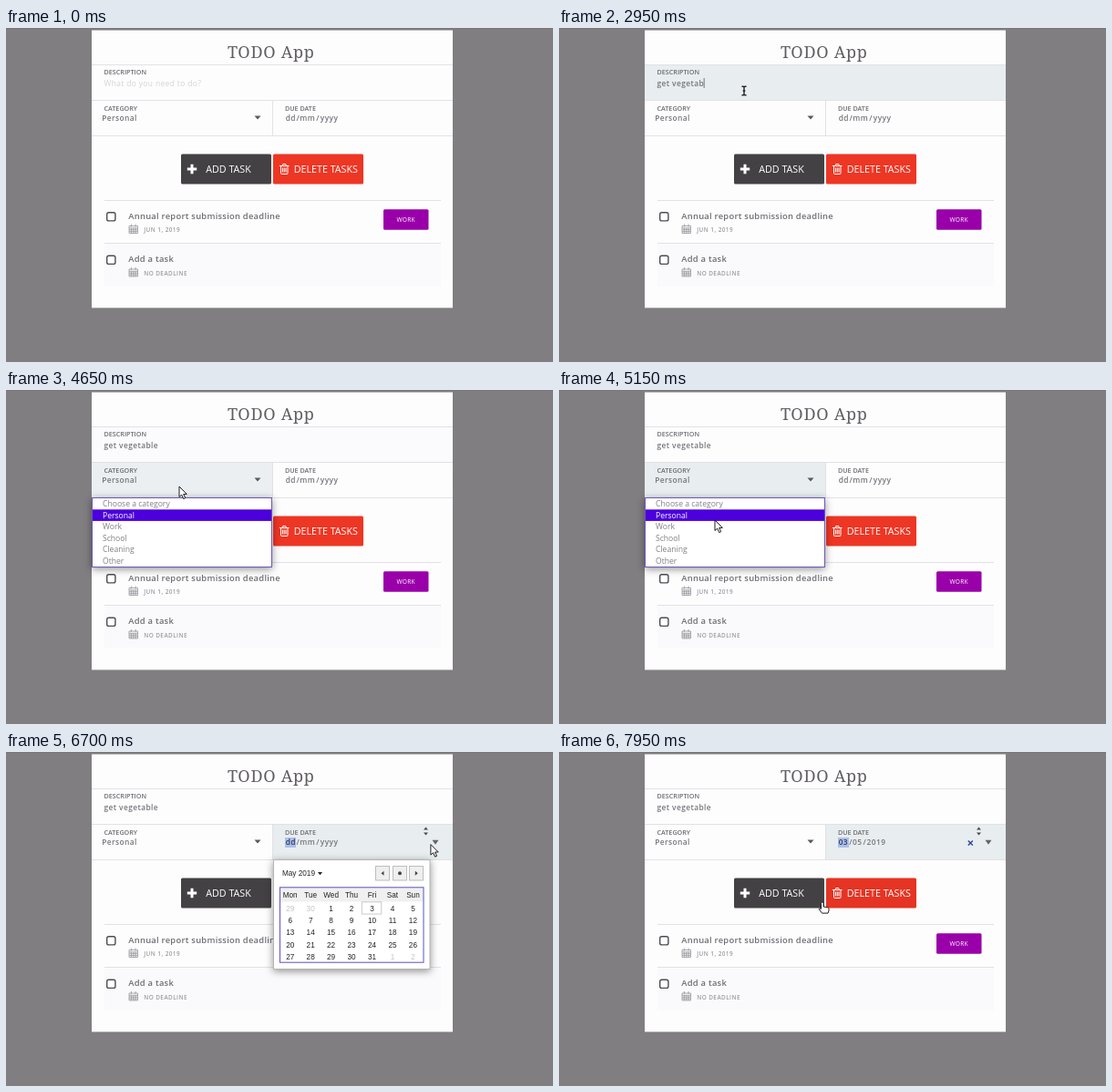
An HTML page for the animation above (8 s loop, 600x367 px).

```html
<!DOCTYPE html>
<html lang="en">
<head>
<meta charset="utf-8">
<title>Task list</title>
<style>
html, body { margin: 0; width: 100%; height: 100%; overflow: hidden; background: #807e80; }
svg { display: block; width: 600px; height: 367px; font-family: "Open Sans", sans-serif; }
text { white-space: pre; }
.title { font: 18px "Noto Serif", serif; letter-spacing: .7px; fill: #605d62; }
.label { font-size: 7.2px; font-weight: 600; fill: #6d6b70; }
.value { font-size: 8.4px; font-weight: 600; letter-spacing: .4px; fill: #76747a; }
.hint { font-weight: 400; fill: #d3d1d6; }
.task { font-size: 9.4px; font-weight: 600; letter-spacing: .25px; fill: #6f6d72; }
.due { font-size: 6.4px; font-weight: 600; letter-spacing: .45px; fill: #9a999e; }
.btn { font-size: 10.7px; fill: #fff; }
.tag { font-size: 6.6px; letter-spacing: .3px; fill: #fff; text-anchor: middle; }
.option { font-size: 8.6px; fill: #807e83; }
.line { stroke: #e2e1e5; }
.focus { fill: #e8edef; }
.popup { filter: drop-shadow(0 2px 4px rgba(0, 0, 0, .42)); }
.cal { font: 8.2px "Liberation Sans", Arial, sans-serif; fill: #222; }
.mid { text-anchor: middle; }
.off { fill: #c4c4c4; }
</style>
</head>
<body>
<svg viewBox="0 0 600 367">
  <rect width="600" height="367" fill="#807e80"/>
  <rect width="600" height="1" fill="#777577"/>
  <rect x="94" y="2.5" width="396" height="305" fill="#fefdfe"/>
  <text class="title" x="243" y="33">TODO App</text>

  <rect id="descFocus" class="focus" x="94" y="40" width="396" height="39"/>
  <rect id="catFocus" class="focus" x="94" y="79" width="198" height="39"/>
  <rect id="dateFocus" class="focus" x="292" y="79" width="198" height="39"/>
  <path class="line" d="M94 40.5H490M94 79.5H490M94 118.5H490M292.5 79V118M108 189.5H477"/>

  <text class="label" x="107.5" y="51">DESCRIPTION</text>
  <text id="hint" class="value hint" x="107.5" y="63.5">What do you need to do?</text>
  <text id="typed" class="value" x="107.5" y="63.5"></text>
  <rect id="caret" y="55" width=".8" height="11" fill="#555"/>

  <text class="label" x="107.5" y="91">CATEGORY</text>
  <text class="value" x="105.2" y="102.3">Personal</text>
  <path d="M272.5 96.5h7l-3.5 4z" fill="#5a585d"/>

  <text class="label" x="306" y="91">DUE DATE</text>
  <rect id="pick" x="306" y="94" width="12" height="11" fill="#aebfe6"/>
  <g id="date" class="value"></g>
  <g id="spinner" fill="#4a4a4d">
    <rect id="spinBox" x="456" y="80.5" width="9" height="12.5" fill="#eeedef"/>
    <path d="M458 85.5h5l-2.5-3zM458 88.5h5l-2.5 3z"/>
    <path d="M467.5 96.8h7l-3.5 5z" fill="#656469"/>
  </g>
  <path id="clear" d="M448.8 97.5l5 5m0-5l-5 5" stroke="#31449c" stroke-width="1.5"/>

  <rect x="192" y="138.5" width="99" height="33" rx="1.5" fill="#434144"/>
  <path d="M198.8 155h10.4M204 149.8v10.4" stroke="#fff" stroke-width="3"/>
  <text class="btn" x="219.3" y="159">ADD TASK</text>
  <rect x="293" y="138.5" width="99" height="33" rx="1.5" fill="#ee3624"/>
  <rect id="shade" x="293" y="138.5" width="99" height="33" rx="1.5"/>
  <path d="M300 151.5h10.5M303 151.3l.8-1.8h2.9l.8 1.8M301.5 151.5v8q0 1 1 1h5.500q1 0 1-1v-8M303.500 153.500v5M305.250 153.500v5M307 153.500v5" fill="none" stroke="#fff"/>
  <text class="btn" x="315.8" y="159">DELETE TASKS</text>

  <g id="tasks"></g>
  <rect x="414" y="199.3" width="49.500" height="22.500" rx="1.500" fill="#9a00a9"/>
  <text class="tag" x="438.7" y="213">WORK</text>

  <g id="menu" class="popup"></g>
  <g id="calendar" class="popup"></g>

  <path id="arrow" d="M0 0V11.500L2.700 9.100L4.700 13.600L6.700 12.700L4.700 8.400H8.300Z" fill="#fff" stroke="#1c1c1c"/>
  <path id="beam" d="M-2.500-4.700h1.500q1 0 1 1v7.400q0 1-1 1h-1.500M2.500-4.700h-1.500q-1 0-1 1M2.500 4.700h-1.500q-1 0-1-1M-1.300 0h2.600" fill="none" stroke="#222" stroke-width="1.400"/>
  <path id="hand" d="M-1.500 1.300a1.300 1.300 0 0 1 2.600 0V5l4.300.7q1.600.3 1.600 1.800v1.700l-1 2.900H-.5L-3.800 7.800q0-1.700 2.300-.4z" fill="#fff" stroke="#1c1c1c"/>
</svg>

<script>
const LOOP = 8000;
const $ = id => document.getElementById(id);
const text = (cls, x, y, s) => `<text class="${cls}" x="${x}" y="${y}">${s}</text>`;
const rect = (x, y, w, h, attrs) => `<rect x="${x}" y="${y}" width="${w}" height="${h}" ${attrs}/>`;
const show = (id, on) => { $(id).style.display = on ? "" : "none"; };
const within = (t, a, b) => t >= a && t < b;

// Task rows
const taskRow = (y, name, due) =>
  rect(110.7, y + 13.7, 9.2, 9.2, 'rx="2" fill="#fff" stroke="#4e4c52" stroke-width="1.400"') +
  text("task", 134.3, y + 20.8, name) +
  `<path transform="translate(134.500 ${y + 26.500})" fill="none" stroke="#97959a" stroke-width=".8"
    d="M.5 2h9.500v8H.5zM.5 4.300H10M.5 6.200H10M.5 8.100H10M2.900 4.300V10M5.250 4.300V10M7.600 4.300V10M2.900 0V3M7.600 0V3"/>` +
  text("due", 151.2, y + 35.3, due);
$("tasks").innerHTML =
  rect(108, 236.5, 369, 47.5, 'fill="#faf9fb"') +
  '<path class="line" d="M108 236.500H477"/>' +
  taskRow(189, "Annual report submission deadline", "JUN 1, 2019") +
  taskRow(236.5, "Add a task", "NO DEADLINE");

// Category menu
const options = ["Choose a category", "Personal", "Work", "School", "Cleaning", "Other"];
$("menu").innerHTML =
  rect(94.5, 118.5, 197, 76, 'fill="#fff" stroke="#6a55bd"') +
  rect(95, 131.3, 196, 12.6, 'fill="#4b00dc"') +
  options.map((s, i) =>
    `<text class="option" x="106" y="${128.3 + i * 12.5}"${i === 1 ? ' style="fill:#fff"' : ""}>${s}</text>`).join("");

// Date popup
const COL = 22.45, ROW = 13.25, GRID_X = 300.5, GRID_Y = 164.8;
const days = "Mon Tue Wed Thu Fri Sat Sun".split(" ");
const colMid = i => GRID_X + (i + .5) * COL;
let cal =
  rect(293.5, 118.5, 171.5, 120, 'fill="#fff" stroke="#b5b5b5"') +
  text("cal", 303, 136.3, "May 2019") +
  '<path d="M342 132h5l-2.500 3.200z" fill="#222"/>' +
  [405.5, 424.5, 442.5].map(x => rect(x, 125.5, 15, 15.5, 'fill="#efefef" stroke="#bdbdbd"')).join("") +
  '<path d="M414.500 130.800v5l-3-2.500zM448.800 130.800v5l3-2.500z" fill="#444"/><circle cx="432" cy="133.300" r="2" fill="#444"/>' +
  rect(300.5, 149, 157.5, 15.5, 'fill="#f0f0f0"') +
  rect(0, 0, COL, ROW, 'id="cell" fill="#dfe1f3"') +
  rect(GRID_X + 4 * COL, GRID_Y, COL - 1, ROW, 'fill="none" stroke="#c9c9c9"');
days.forEach((d, i) => { cal += text("cal mid", colMid(i), 159.6, d); });
for (let i = 0; i < 35; i++) {
  const day = i - 1, off = day < 1 || day > 31;
  const label = day < 1 ? day + 30 : day > 31 ? day - 31 : day;
  cal += text("cal mid" + (off ? " off" : ""), colMid(i % 7), GRID_Y + 10 + Math.floor(i / 7) * ROW, label);
}
$("calendar").innerHTML = cal + rect(300.5, 148.8, 157.5, 82.4, 'fill="none" stroke="#5a50c4"');

// Date parts: x and string
const dateParts = parts => parts.map(([x, s], i) =>
  `<text x="${x}" y="102.3">${s}</text>`).join("");
const emptyDate = dateParts([[306.7, "dd"], [318.4, "/"], [322.3, "mm"], [340.3, "/"], [344.8, "yyyy"]]);
const fullDate = dateParts([[306.7, "03"], [318.2, "/"], [322, "05"], [333.6, "/"], [337.6, "2019"]]);

// Timeline
const phrase = "get vegetable";
const keys = [1200, 1300, 1400, 1650, 1900, 2050, 2300, 2450, 2600, 2750, 2950, 3150, 3350];
const CLICK_DESC = 1100, OPEN_MENU = 4550, CLOSE_MENU = 5520, OPEN_CAL = 6550, CLOSE_CAL = 7520;
const path = [
  [50, 494, 255], [450, 462, 212], [850, 376, 158], [1080, 203, 69], [3800, 203, 69],
  [4250, 204.5, 108], [4550, 190, 106], [4700, 190, 106], [5150, 171, 143], [5400, 168, 138],
  [5550, 168, 138], [6100, 455.3, 96.5], [6300, 470, 97], [6600, 470, 97], [7300, 397.5, 178.2],
  [7420, 401, 173], [7560, 401, 173], [7950, 289, 165], [8000, 286, 164]
];
const hover = [[0, 0], [800, 0], [900, .08], [980, .08], [1150, 0], [7700, 0], [7800, .08], [7900, .08], [8000, 0]];

function sample(table, t, ease = p => p) {
  let i = 0;
  while (i < table.length - 2 && t >= table[i + 1][0]) i++;
  const a = table[i], b = table[i + 1];
  const p = ease(Math.min(1, Math.max(0, (t - a[0]) / (b[0] - a[0]))));
  return a.slice(1).map((v, k) => v + (b[k + 1] - v) * p);
}
const smooth = p => p * p * (3 - 2 * p);
const fade = (t, a, b) => Math.min(1, Math.max(0, (t - a) / 120)) * (1 - Math.min(1, Math.max(0, (t - b) / 120)));

let typedCount = -1, dateState = "";
function draw(t) {
  const [x, y] = sample(path, t, smooth);

  $("descFocus").style.opacity = fade(t, CLICK_DESC, OPEN_MENU);
  $("catFocus").style.opacity = fade(t, OPEN_MENU, OPEN_CAL);
  $("dateFocus").style.opacity = fade(t, OPEN_CAL, LOOP);
  $("shade").style.opacity = sample(hover, t)[0];

  const count = keys.filter(k => t >= k).length;
  if (count !== typedCount) {
    typedCount = count;
    $("typed").textContent = phrase.slice(0, count);
    $("caret").setAttribute("x", 107.2 + (count ? $("typed").getComputedTextLength() : 0));
  }
  show("hint", !count);
  const lastKey = count ? keys[count - 1] : CLICK_DESC;
  show("caret", within(t, CLICK_DESC, OPEN_MENU) && (t - lastKey) % 1000 < 500);

  const picked = t >= CLOSE_CAL, calOpen = within(t, OPEN_CAL, CLOSE_CAL);
  const date = picked ? fullDate : emptyDate;
  if (date !== dateState) $("date").innerHTML = dateState = date;
  $("date").firstChild.style.fill = t >= OPEN_CAL ? "#2c3a6b" : "";
  show("pick", t >= OPEN_CAL);
  const overDate = t > CLOSE_MENU && x > 292 && y > 79 && y < 118;
  show("spinner", overDate || t >= OPEN_CAL);
  show("spinBox", t < OPEN_CAL);
  show("clear", picked);

  show("menu", within(t, OPEN_MENU, CLOSE_MENU));
  show("calendar", calOpen);
  const col = Math.floor((x - GRID_X) / COL), row = Math.floor((y - GRID_Y) / ROW);
  const inGrid = within(col, 0, 7) && within(row, 0, 5);
  show("cell", inGrid);
  if (inGrid) {
    $("cell").setAttribute("x", GRID_X + col * COL);
    $("cell").setAttribute("y", GRID_Y + row * ROW);
  }

  const onButtons = y > 138 && y < 172 && x > 192 && x < 392;
  const kind = t < OPEN_MENU && y > 52 && y < 79 ? "beam"
    : !calOpen && !within(t, OPEN_MENU, CLOSE_MENU) && (onButtons || (overDate && x > 444)) ? "hand" : "arrow";
  for (const id of ["arrow", "beam", "hand"]) {
    show(id, t >= 50 && id === kind);
    $(id).setAttribute("transform", `translate(${x} ${y})`);
  }
}

const start = performance.now();
function tick() {
  draw((performance.now() - start) % LOOP);
  requestAnimationFrame(tick);
}
tick();
</script>
</body>
</html>
```
